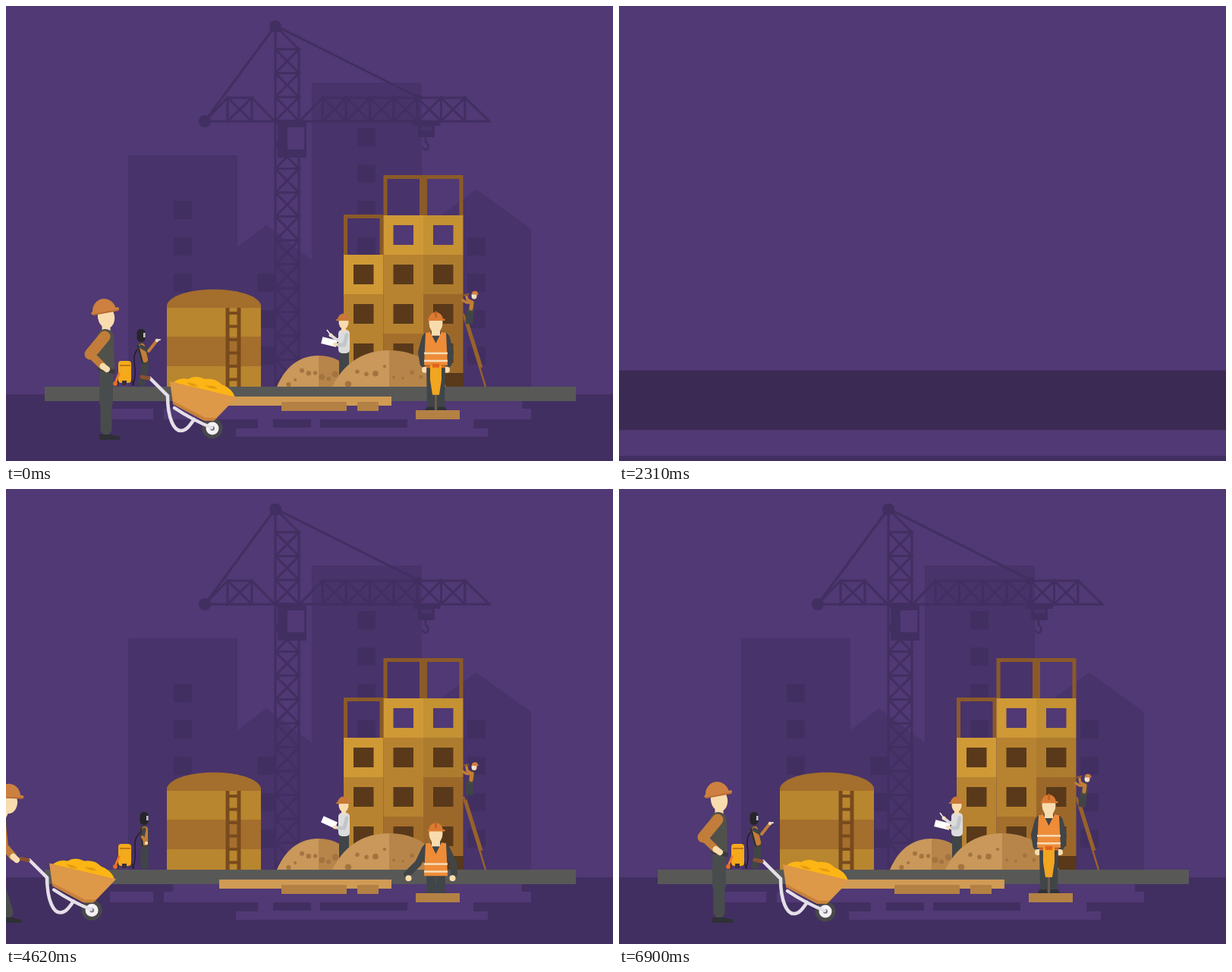
An HTML page with a canvas that plays this animation: 800 px wide and 600 px high, repeating every 6.93 s.

```html
<!DOCTYPE html>
<html>
<head>
<meta charset="utf-8">
<title>Construction site</title>
<style>
html, body { margin: 0; width: 100%; height: 100%; overflow: hidden; background: #503974; }
canvas { display: block; }
</style>
</head>
<body>
<canvas id="stage" width="800" height="600"></canvas>
<script>
const g = document.getElementById('stage').getContext('2d');
const LOOP = 6930, FLOOR = 502;
const BG = '#503974', GROUND = '#422f61', BLOCK = '#48336a', DARK = '#404548',
      SKIN = '#f8dcae', HAT = '#d08040', SLEEVE = '#c27d3a', GOLD = '#b8862f', BROWN = '#a46e2c',
      PLANK = '#b48145';
let T = 0; // timeline: the build-up starts at 2600, work carries on past LOOP

// timing
const clamp = x => Math.max(0, Math.min(1, x));
const mix = (a, b, k) => a + (b - a) * k;
const smooth = (a, b) => { const u = clamp((T - a) / (b - a)); return u * u * (3 - 2 * u); };
const wipe = (start, dur) => {
  const u = 1 - Math.pow(1 - clamp((T - start) / dur), 1.5);
  return Math.sin(u * Math.PI / 2) ** 2;
};
const rest = (start, dur, s) => { // remaining share of a rise that overshoots
  const w = 1 - clamp((T - start) / dur);
  return (s + 1) * w ** 3 - s * w * w;
};
function random(seed) {
  return () => (seed = seed * 16807 % 2147483647) / 2147483647;
}

// shapes
function box(c, x, y, w, h) { g.fillStyle = c; g.fillRect(x, y, w, h); }
function pill(c, x, y, w, h, r) {
  g.beginPath(); g.roundRect(x, y, w, h, r);
  g.fillStyle = c; g.fill();
}
function path(p) { g.beginPath(); p.forEach(([x, y]) => g.lineTo(x, y)); }
function poly(c, ...p) { path(p); g.fillStyle = c; g.fill(); }
function line(c, w, ...p) {
  path(p);
  g.strokeStyle = c; g.lineWidth = w; g.stroke();
}
function limb(c, w, ...p) {
  g.lineCap = g.lineJoin = 'round';
  line(c, w, ...p);
  g.lineCap = 'butt'; g.lineJoin = 'miter';
}
function oval(c, x, y, rx, ry = rx, a = 0, b = 2 * Math.PI) {
  g.beginPath(); g.ellipse(x, y, rx, ry, 0, a, b);
  g.fillStyle = c; g.fill();
}
function svg(c, d, w) {
  const p = new Path2D(d);
  if (w) { g.strokeStyle = c; g.lineWidth = w; g.stroke(p); } else { g.fillStyle = c; g.fill(p); }
}
function at(x, y, draw, turn = 0) {
  g.save(); g.translate(x, y); g.rotate(turn); draw(); g.restore();
}
function rise(start, dur, dist, s, draw, floor = 0) {
  if (T < start) return;
  g.save();
  if (floor) { g.beginPath(); g.rect(0, 0, 800, floor); g.clip(); }
  g.translate(0, dist * rest(start, dur, s));
  draw();
  g.restore();
}

// backdrop
function tower(x, top, w, windowX, windowY, roof = 0) {
  poly(BLOCK, [x, top + roof], [x + w / 2, top], [x + w, top + roof], [x + w, 620], [x, 620]);
  for (let y = windowY; y < 480; y += 48) box(GROUND, windowX, y, 24, 24);
}

function truss(x, n, step) {
  for (let i = 0; i < n; i++, x += step) {
    line(GROUND, 3, [x + step, 152], [x, 121], [x, 152], [x + step, 121], [x + step, 152]);
  }
}

function crane() {
  const l = (...p) => line(GROUND, 3, ...p);
  for (let y = 57; y < 600; y += 31.5) {
    l([355, y], [386, y], [355, y + 31.5]);
    l([355, y], [386, y + 31.5]);
  }
  l([386, 620], [386, 57], [355, 26], [355, 620]);
  l([262, 152], [355, 26], [545, 121]);
  l([262, 152], [637, 152], [605, 121], [417, 121], [387, 152]);
  l([262, 152], [292, 121], [324, 121], [354, 152]);
  truss(292, 1, 32);
  truss(417, 6, 31.3);
  oval(GROUND, 355, 27, 8); oval(GROUND, 262, 152, 8); oval(GROUND, 543, 121, 5);
  box(GROUND, 358, 153, 38, 47); box(BG, 371, 160, 22, 29);
  box(GROUND, 536, 152, 36, 6); box(GROUND, 543, 158, 22, 15); box(BLOCK, 547, 159, 14, 5);
  svg(GROUND, 'M553 173V179Q559 184 555 189Q551 191 549 186', 2.5);
}

function backdrop() {
  const grow = (start, dist, draw) => rise(start, 740, dist, .8, draw);
  grow(3811, 223, () => tower(283, 289, 120, 331, 353, 46));
  grow(3815, 270, () => tower(548, 242, 144, 608, 305, 52));
  grow(3626, 315, () => tower(161, 197, 144, 221, 257));
  grow(3648, 411, () => tower(403, 101, 145, 463, 161));
  grow(3663, 493, crane);
}

function ground() {
  [GROUND, '#35244f', GROUND].forEach((c, i) => box(c, 0, 512, 800 * wipe(2729 + 71 * i, 390), 88));
  const slab = (dist, c, ...b) => rise(3590, 600, dist, 1.7, () => box(c, ...b));
  slab(590, BG, 220, 521, 460, 11);
  slab(530, BG, 208, 531, 484, 14);
  slab(245, BG, 137, 531, 57, 14);
  slab(470, BG, 332, 545, 284, 12);
  slab(470, GROUND, 352, 545, 50, 11);
  slab(470, GROUND, 414, 545, 115, 11);
  slab(470, BG, 303, 557, 332, 11);
  slab(98, '#585957', 51, 502, 700, 19);
  slab(13, '#d09b54', 281, 515, 227, 12);
  slab(155, PLANK, 363, 522, 86, 12);
  slab(68, PLANK, 463, 522, 28, 12);
  slab(300, PLANK, 540, 533, 58, 12);
}

// structures
function tank() {
  box(GOLD, 212, 398, 124, 104);
  box(BROWN, 212, 436, 124, 39);
  svg(BROWN, 'M212 398V394C222 367 326 367 336 394V398Z');
  [292, 307].forEach(x => line('#784a1d', 5, [x, 398], [x, 502]));
  for (let y = 405; y < 500; y += 17.5) line('#784a1d', 4, [290, y], [309, y]);
}

function mound(x, h, w, seed) {
  const half = side => svg(side < 0 ? '#c9985a' : '#b7854a',
    `M${x} ${FLOOR}H${x + side * w}C${x + side * w * .82} ${FLOOR - h * .58} ${x + side * w * .5} ${FLOOR - h} ${x} ${FLOOR - h}Z`);
  half(-1); half(1);
  const rnd = random(seed);
  for (let i = 0; i < 10; i++) { // one spot per slice, kept under the slope
    const u = (i + .5) / 5 - 1;
    oval('#a37440', x + u * w * .8, FLOOR - h * (1 - u * u * .8) * mix(.2, .72, rnd()), mix(1.8, 4.8, rnd()));
  }
}

function column(i) {
  const x = 445 + 52.5 * i, top = i ? 276 : 328;
  line('#8b5a29', 5, [x + 2.5, top], [x + 2.5, top - 50.5], [x + 50, top - 50.5], [x + 50, top]);
  for (let y = top; y < FLOOR; y += 52) {
    const row = (y - 276) / 52, shade = row ? Math.floor((row + i) / 2) : 0;
    box(['#cf9936', '#b78330', BROWN][shade], x, y, 52.5, Math.min(52.3, FLOOR - y));
    if (i == 2) box('#0000000d', x, y, 52.5, 52);
    box(row ? '#59391a' : BG, x + 13, y + 13, 26.5, 26);
  }
  if (i == 2) box('#59391a', 576, 485, 26, 17);
}

function ladder() {
  if (T < 4150) return;
  at(632, FLOOR, () => {
    line('#98632a', 2.5, [-29, -96], [0, 0]);
    line('#98632a', 5, [-27, -92], [-6, -25]);
  }, .5 * rest(4150, 420, 1.2));
}

function generator() {
  limb('#33262f', 2, [147, 500], [150, 484]);
  limb('#33262f', 2, [168, 500], [163, 488]);
  pill('#f4aa1b', 148, 468, 17, 29, 4);
  box('#bd7617', 150, 473, 14, 2);
  limb('#ef7a25', 3, [149, 485], [144, 497]);
  oval('#e36c25', 144, 498, 3);
  box('#37303a', 153, 494, 6, 6);
}

// people
function helmet(x, y, r, c = HAT) {
  oval(c, x, y, r, r * 1.05, Math.PI, 2 * Math.PI);
  limb(c, r * .25, [x - r, y], [x + r * 1.15, y]);
}

function welder() {
  const w = smooth(5000, 5400) * (1 - smooth(7680, 8300));
  const lean = 182 - 4 * w, lift = mix(0, 10, smooth(5700, 6300));
  svg('#241b2d', `M167 500C176 480 162 465 ${lean - 4} 452`, 1.5);
  [0, 4].forEach(dx => limb(DARK, 6, [181 + dx, 472], [180 + dx, 485], [181 + dx - 4 * w, 498]));
  limb('#44413f', 11, [lean, 449], [183, 468]);
  limb(SLEEVE, 8, [lean + 1, 449], [183, 466]);
  limb('#2b2a31', 2, [lean - 4, 448], [180, 470]);
  const hand = [mix(185, 199, w), mix(467, 451 - lift, w)];
  const elbow = [mix(180, 188, w), mix(459, 455, w)];
  limb(DARK, 5, [lean, 449], elbow);
  limb(SLEEVE, 4, elbow, hand);
  oval(SKIN, ...hand, 2.2);
  if (w > .1) limb('#e6ddd4', 2, hand, [hand[0] + 4, hand[1] - 1]);
  pill('#262529', lean - 5.5, 426, 11, 17, 5);
  box('#c6c8cd', lean + 3, 431, 2.5, 6);
}

function writer() {
  const v = smooth(5600, 6050) * (1 - smooth(7800, 8250));
  box(DARK, 439, 456, 13, 34);
  pill('#dcdcdd', 438, 427, 15, 31, 5);
  box(SKIN, 442, 420, 6, 9);
  oval(SKIN, 445, 417, 6.5, 9);
  at(445, 414, () => { g.scale(-1, 1); helmet(0, 0, 8, '#c87937'); });
  at(426, mix(439.5, 443, v), () => box('#fff', -10, -4.5, 20, 9), mix(.42, .25, v));
  limb('#c3c6c8', 5, [449, 434], [446, 447], [438, 447]);
  oval(SKIN, 434, 446, 3, 2.5);
  if (v > .05) {
    const hand = [mix(434, 429, v) + v * Math.sin(T / 70), mix(445, 434, v)];
    limb('#dcdcdd', 4, [444, 433], [437, 441], hand);
    oval(SKIN, ...hand, 2.5);
    line('#eee', 1.5, hand, [hand[0] - 5, hand[1] - 7]);
  }
}

function climber() {
  const hit = 2 * Math.sin(T * Math.PI / 150) * smooth(4900, 5200);
  [608, 613].forEach(x => limb(DARK, 5, [x + 1, 403], [x, 417]));
  limb('#4b4742', 8, [614, 391], [613, 401]);
  limb(SLEEVE, 5, [614, 391], [613, 399]);
  limb(SLEEVE, 3.5, [613, 391], [607, 391], [602, 388]);
  limb(SLEEVE, 3.5, [613, 390], [608, 387], [607, 382 + hit]);
  limb('#8a5a28', 2.5, [604, 380 + hit], [609, 379 + hit]);
  oval(SKIN, 617, 382, 3.5, 4.5);
  box('#e8e8ea', 614, 380, 3, 4);
  helmet(618, 380, 4);
}

function jackhammer() {
  box('#6a5a4e', 565, 508, 3, 25);
  line('#e26a24', 3, [554, 475], [579, 475]);
  poly('#f2a51f', [559, 473], [574, 473], [574, 492], [571, 512], [562, 512], [559, 492]);
  box('#e2621f', 562, 471, 9, 5);
}

function driller() {
  const open = 1 - smooth(4900, 5250), x = 566.5;
  at(0, smooth(5450, 5600) * .7 * Math.abs(Math.sin(T * Math.PI / 60)), () => {
    for (const s of [-1, 1]) {
      const reach = mix(14.5, 29 - 7 * s, open);
      limb(DARK, 9, [x + s * 14, 437], [x + s * mix(19, 23, open), 456], [x + s * (reach + 2), 471]);
      oval(SKIN, x + s * reach, 479 - 3 * open, 4);
      poly(DARK, [x, 470], [x + s * 12.5, 470], [x + s * 11.5, 530], [x + s * 1.5, 530]);
      poly('#2f3338', [x + s, 533], [x + s * 3, 528], [x + s * 12, 528], [x + s * 15, 533]);
    }
    pill(DARK, 549, 429, 35, 30, 8);
    poly('#ee8c38', [553, 430], [559, 429], [x, 444], [574, 429], [580, 430], [582, 473], [551, 473]);
    [456, 466].forEach(y => box('#f6ddb8', 551, y, 31, 2.5));
    box(SKIN, 561, 424, 11, 10);
    oval(SKIN, x, 417, 9, 13);
    helmet(x, 413, 9.5, '#dd7a31');
    box('#bf6528', 565, 402, 3, 8);
    rise(4950, 400, 75, 1, jackhammer, 533);
  });
}

function barrow() {
  svg('#fdb515', 'M219 498Q228 489 240 492Q250 486 262 492Q276 490 284 499Q298 504 302 516Z');
  svg('#e39a10', 'M238 496l10 2 6 4-10-1zM262 500l12 1 5 4-10-1z');
  oval('#48484b', 272, 557, 13.5);
  oval('#f4f1f4', 272, 557, 8.5);
  oval('#77757c', 272, 557, 3);
  g.lineCap = 'round';
  svg('#e4dfe8', 'M190 491L213 514C213 545 222 561 231 560C238 560 243 552 248 545M222 530Q246 546 271 556', 4.5);
  g.lineCap = 'butt';
  poly('#dd9848', [216, 495], [304, 516], [276, 545], [262, 546], [220, 524]);
  poly('#c9823a', [220, 521], [263, 543], [278, 543], [274, 547], [261, 547], [220, 525]);
  limb('#8a5130', 5, [179, 489], [188, 491]);
}

function leg(c, hip, phase, walk) {
  const lift = Math.max(0, -Math.sin(phase)) * walk;
  const x = hip + walk * 29 * Math.cos(phase) - 32 * lift, y = 564 - 18 * lift;
  const knee = [(hip + x) / 2 + 3 * walk + 10 * lift, 522];
  limb(c, 18, [hip, 484], knee);
  limb(c, 15, knee, [x, y - 6]);
  at(x, y, () => poly('#2d3034', [-9, 1], [5, 1], [18, 4], [18, 8], [-9, 8]), .7 * lift);
}

function porter(walk) {
  const bend = 1 - smooth(6150, 6650) + smooth(7680, 8280);
  const phase = (T - 4620) / 648 * 2 * Math.PI;
  const push = walk * Math.sin(phase) ** 2; // leans into each step
  const joint = (x, y, x2, y2, lean = 0) => [mix(x, x2, bend) + lean * push, mix(y, y2, bend)];
  const hip = 132 + 4 * push;
  leg('#3c4144', hip, phase + Math.PI, walk);
  leg('#484c4d', hip, phase, walk);
  const shoulder = joint(131, 437, 149, 441, 8), head = joint(132, 410, 163, 413, 7);
  limb(SKIN, 11, joint(132, 430, 154, 431, 8), head);
  limb('#50514b', 22, [hip, 474], shoulder);
  limb('#3a3b3c', 6, [hip - 8, 478], [hip + 9, 482]);
  const elbow = joint(111, 459, 154, 468, 11), hand = joint(133, 479, 173, 489, 9);
  const wrist = [mix(elbow[0], hand[0], .75), mix(elbow[1], hand[1], .8)];
  limb(SLEEVE, 15, joint(130, 436, 151, 439, 8), elbow);
  limb(SLEEVE, 10, elbow, wrist);
  limb(SKIN, 8, wrist, hand);
  at(...head, () => {
    oval(SKIN, 0, 0, 11, 15);
    helmet(-1, -8, 15.5, '#cd8040');
    limb('#b96d33', 2, [-16, -6], [17, -6]);
  }, mix(-.18, .05, bend));
}

function draw(t) {
  T = t < 2600 ? t + LOOP : t;
  box(BG, 0, 0, 800, 600);
  backdrop();
  ground();
  const grow = (start, dist, draw) => rise(start, 540, dist, 1, draw, FLOOR);
  grow(3900, 135, tank);
  grow(3990, 50, () => mound(412, 41, 55, 11));
  for (let i = 0; i < 3; i++) grow(3890 + 35 * i, 290, () => column(i));
  ladder();
  rise(4390, 500, 216, 1.7, climber, FLOOR);
  grow(4060, 110, writer);
  grow(4030, 55, () => mound(505, 48, 75, 29));
  grow(4020, 45, generator);
  grow(4060, 90, welder);
  rise(4494, 600, 140, 1.7, driller, 533);
  const left = Math.max(0, 5780 - T), walk = 1 - smooth(5700, 6050);
  at(-.1167 * left - 1.76e-5 * left ** 2, 0, () => {
    at(0, -1.5 * walk, barrow);
    porter(walk);
  });
  if (t < 2600) {
    [BG, '#3b2a54', BG].forEach((c, i) => box(c, 0, 0, 800, 600 * wipe(LOOP + 1876 + 72 * i, 522)));
  }
}

function frame() {
  draw(performance.now() % LOOP);
  requestAnimationFrame(frame);
}
frame();
</script>
</body>
</html>
```
